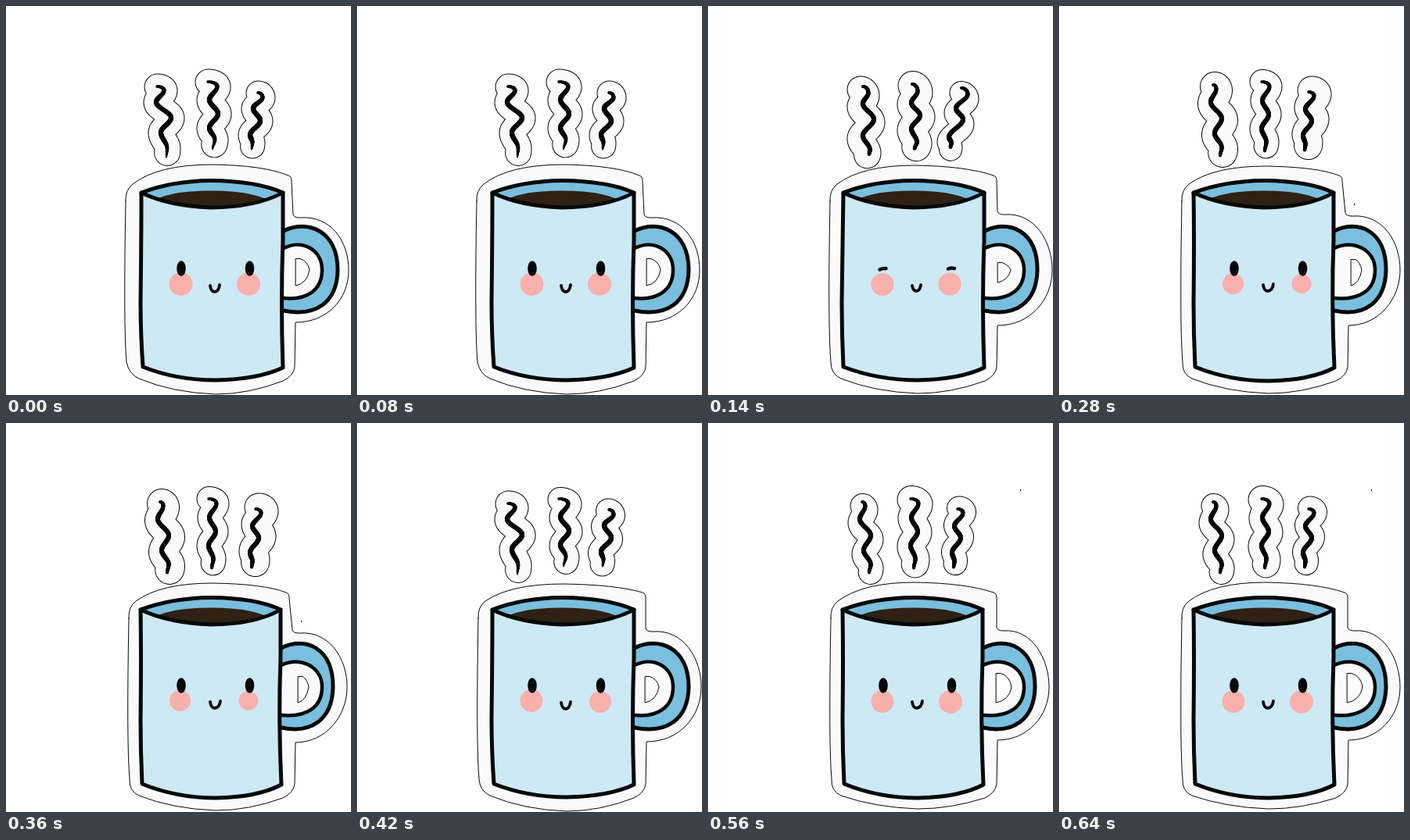
These frames come from a looping animation (441x498 px, 700 ms). An HTML page with a canvas:

```html
<!DOCTYPE html>
<html>
<head>
<meta charset="utf-8">
<style>
html, body { margin: 0; width: 441px; height: 498px; overflow: hidden; background: #fff }
canvas { display: block }
</style>
</head>
<body>
<canvas id="stage" width="441" height="498"></canvas>
<script>
const ctx = document.getElementById('stage').getContext('2d');
const INK = '#050808', PAPER = '#fafafa', BLUE = '#7abfde', PALE = '#cde9f4';
const COFFEE = '#2f2113', BLUSH = '#f8b0ad';
const STEP = 140;

// steam: hook start, then the turning points of each wisp
// taper: brush radius at start, middle and end
const OPEN = {
  steam: [
    [193,103, 202,108, 192,123, 211,143, 198,162, 206,182, 205,194],
    [258,97, 270,103, 260,120, 271,138, 260,156, 267,171, 264,184],
    [322,111, 328,117, 316,131, 325,147, 312,165, 315,175, 314,184]],
  taper: [1.8, 3.1, 1],
  left: 173, foot: 175, right: 354, rightFoot: 354, sag: 172, bottom: 479,
  handle: 426, inner: 405, mouth: [261, 358, 366, 273]
};
const BLINK = {
  steam: [
    [198,103, 205,111, 198,125, 212,145, 198,166, 207,184, 206,190],
    [261,100, 268,109, 260,124, 271,140, 260,157, 267,174, 264,183],
    [324,105, 332,113, 317,131, 326,145, 308,168, 311,175, 310,181]],
  taper: [2, 3, 2.2],
  left: 173, foot: 173, right: 353, rightFoot: 353, sag: 171, bottom: 479,
  handle: 423, inner: 405, mouth: [261, 358, 365, 272], closed: true
};
const SWAY = {
  steam: [
    [197,101, 201,106, 194,123, 208,144, 199,163, 208,181, 206,192],
    [259,97, 269,103, 260,121, 268,139, 259,157, 265,174, 263,186],
    [319,110, 326,115, 315,132, 323,147, 312,166, 315,177, 314,185]],
  taper: [1.8, 3, 2],
  left: 172, foot: 174, right: 351, rightFoot: 352, sag: 172, bottom: 480,
  handle: 420, inner: 405, mouth: [261, 357, 365, 274]
};

// halo: radius, dx, dy for each wisp
// edge: left, top, rim corner x, notch x, notch y, handle right, handle bottom, base
// hole: left, top, right, bottom; cheeks: x, y, radius twice
const FRAMES = [
  { pose: OPEN, halo: [[16.5,.5,.5], [16.5,.5,.5], [15.5,.5,.5]],
    edge: [152,203,365,368,271,438,405,497], hole: [370,323,388,358],
    cheeks: [223.5,356,15, 310,356,15] },
  { pose: BLINK, halo: [[17,-3,4], [18.5,.5,2], [14.5,-.5,6]],
    edge: [155,204,369,371,267,440,409,496], hole: [370,328,387,354],
    cheeks: [223,356.5,14.5, 309,356,14.5] },
  { pose: SWAY, halo: [[18.5,2,2], [15.5,.5,0], [18,4,-2]],
    edge: [156,205,362,367,269,436,409,496], hole: [373,324,387,358],
    cheeks: [222.5,355.5,13.5, 310,355.5,12.5], speck: [377,253] },
  { pose: OPEN, halo: [[16.5,.5,.5], [15.5,1.5,1], [15.5,-1,1.5]],
    edge: [154,206,369,370,267,440,408,497], hole: [368,324,386,358],
    cheeks: [223,355.5,14.5, 311,357,14] },
  { pose: SWAY, halo: [[15.5,.5,5], [17.5,.5,1], [15,1.5,-1]],
    edge: [156,204,369,370,266,436,406,494], hole: [368,320,388,358],
    cheeks: [223,356.5,14.5, 310,357,15], speck: [399,85] }
];

function shape(d, fill, stroke, width) {
  const path = new Path2D(d);
  if (fill) { ctx.fillStyle = fill; ctx.fill(path); }
  if (stroke) { ctx.strokeStyle = stroke; ctx.lineWidth = width; ctx.stroke(path); }
}

function oval(x, y, rx, ry, fill) {
  ctx.beginPath();
  ctx.ellipse(x, y, rx, ry, 0, 0, 7);
  ctx.fillStyle = fill;
  ctx.fill();
}

// A quarter-round hook, then half-cosine swings between turning points
function wisp(p) {
  const points = [];
  for (let i = 0; i < p.length - 2; i += 2) {
    for (let t = 0; t < 1; t += .05) {
      const a = t * Math.PI;
      const u = i ? (1 - Math.cos(a)) / 2 : Math.sin(a / 2);
      const v = i ? t : 1 - Math.cos(a / 2);
      points.push([p[i] + (p[i + 2] - p[i]) * u, p[i + 1] + (p[i + 3] - p[i + 1]) * v]);
    }
  }
  return points;
}

function drawHalo(points, [r, dx, dy]) {
  const d = 'M' + points.slice(0, -10).map(([x, y]) => [x + dx, y + dy]).join('L');
  shape(d, null, INK, 2 * r + 1);
  shape(d, null, PAPER, 2 * r - 1);
}

function drawWisp(points, [start, middle, end]) {
  points.forEach(([x, y], i) => {
    const t = i / (points.length - 1);
    const r = t < .3 ? start + (middle - start) * t / .3
      : t > .75 ? middle + (end - middle) * (t - .75) / .25 : middle;
    oval(x, y, r, r, INK);
  });
}

function drawSticker([l, t, r, nx, ny, hr, hb, b]) {
  shape(`M${l + 1} 250Q${l} 236 ${l + 10} 228Q${l + 42} ${t} 264 ${t}
    Q330 ${t + 1} ${r - 4} 217Q${r} 218 ${r} 224L${nx - 1} ${ny - 4}
    Q${nx} ${ny} ${nx + 8} ${ny}C${hr - 22} ${ny - 3} ${hr} 302 ${hr} 338
    C${hr} 376 ${hr - 28} ${hb} 370 ${hb}L369 462Q368 473 354 480
    Q310 ${b} 268 ${b}Q213 ${b - 2} 170 477Q157 471 ${l + 2} 456
    Q${l - 2} 410 ${l + 1} 250Z`, PAPER, INK, 1);
}

function drawHandle(p, [l, t, r, b]) {
  const x = p.right + 1, o = p.handle - 2, i = p.inner - 1;
  shape(`M${x} 288C${x + 30} 273 ${o} 287 ${o} 338C${o - 1} 380 ${o - 28} 398 ${x} 390`,
    BLUE, INK, 5);
  shape(`M${x} 310C${x + 24} 298 ${i} 312 ${i} 338C${i} 364 ${i - 20} 377 ${x} 374`,
    PAPER, INK, 4.5);
  shape(`M${l + .5} ${t + .5}H${l + 6}Q${r - 2} ${t + 4} ${r} 338
    Q${r - 3} ${b - 3} ${l + .5} ${b}Z`, '#fff', INK, 1);
}

function drawMug(p) {
  const { left: l, foot: f, right: r, rightFoot: rf, sag, bottom: b } = p;
  const back = `M${l} 239Q212 224 262 223.500Q320 224 ${r} 239`;
  const front = `Q318 258 262 258Q208 256 ${l} 239`;
  shape(`M${l} 239Q${sag + 1} 300 ${sag} 380Q${sag} 420 ${f} 462Q218 ${b} 268 ${b}
    Q322 ${b - 1} ${rf} 463Q${r - 3} 380 ${r} 300V239Z`, PALE, INK, 5);
  const rim = back + front;
  shape(rim, BLUE);
  ctx.save();
  ctx.clip(new Path2D(rim));
  oval(262, 254, 76, 17.5, COFFEE);
  ctx.restore();
  shape(rim + 'Z', null, INK, 4.8);
}

function drawFace(p, c) {
  oval(c[0], c[1], c[2], c[2], BLUSH);
  oval(c[3], c[4], c[5], c[5], BLUSH);
  if (p.closed) {
    shape('M219.500 337.500Q223 335.500 227.500 336M307 336.500Q311 335 315 336', null, INK, 4.5);
  } else {
    oval(224, 336, 5.8, 9.8, INK);
    oval(311.5, 336, 5.8, 9.8, INK);
  }
  const [x, y, low, end] = p.mouth;
  shape(`M${x} ${y}Q${x + 1} ${low} 267 ${low}Q${end - 1} ${low - 1} ${end} ${y - 1}`,
    null, INK, 3.8);
}

function draw(now) {
  const frame = FRAMES[Math.floor(now / STEP) % FRAMES.length], pose = frame.pose;
  ctx.lineCap = ctx.lineJoin = 'round';
  ctx.fillStyle = '#fff';
  ctx.fillRect(0, 0, 441, 498);
  pose.steam.map(wisp).forEach((points, i) => {
    drawHalo(points, frame.halo[i]);
    drawWisp(points, pose.taper);
  });
  drawSticker(frame.edge);
  drawHandle(pose, frame.hole);
  drawMug(pose);
  drawFace(pose, frame.cheeks);
  if (frame.speck) {
    ctx.fillStyle = INK;
    ctx.fillRect(...frame.speck, 1, 2);
  }
  requestAnimationFrame(draw);
}
draw(0);
</script>
</body>
</html>
```
